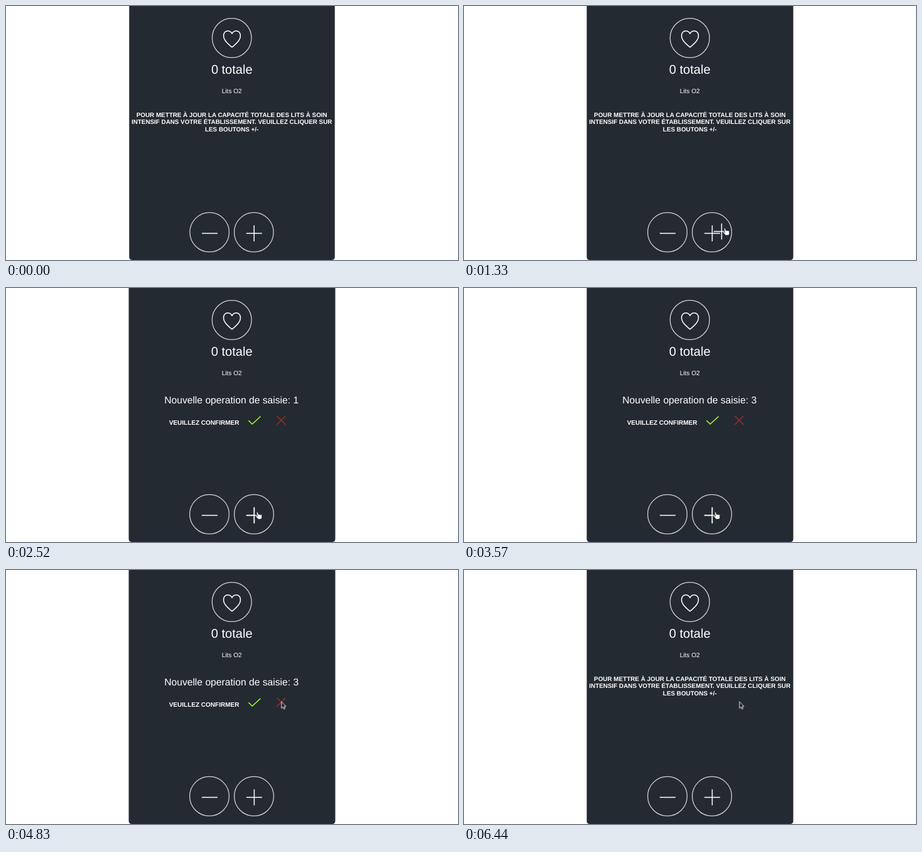
Write an HTML page that moves like this. It is 720 px wide and 405 px high and loops after 8 s.

```html
<!DOCTYPE html>
<html lang="fr">
<head>
<meta charset="utf-8">
<title>Lits O2</title>
<style>
  html, body { margin: 0; width: 100%; height: 100%; overflow: hidden; background: #fff; }
  svg { display: block; width: 100vw; height: 100vh; }
  text {
    font-family: "Liberation Sans", Arial, sans-serif;
    fill: #fff; text-anchor: middle; text-rendering: geometricPrecision;
  }
  .title { font-size: 20.1px; }
  .label { font-size: 10.1px; }
  .info { font-size: 9.9px; font-weight: bold; }
  .entry { font-size: 15.65px; text-anchor: start; }
  .ask { font-size: 10px; font-weight: bold; text-anchor: start; }
  .ring { fill: none; stroke: #d0d1d2; stroke-width: 1.3; }
  .icon { fill: none; stroke: #fff; stroke-width: 1.5; }

  #panel, .help, .confirm, .n1, .n2, .n3, .no, .arrow, .hand {
    animation: 8s step-end infinite;
  }
  #panel { transform-origin: 360px 0; animation-name: settle; }
  .help { animation-name: help; }
  .confirm { animation-name: confirm; }
  .n1 { animation-name: one; }
  .n2 { animation-name: two; }
  .n3 { animation-name: three; }
  .no { animation-name: press; }
  .arrow { animation-name: arrow; }
  .hand { animation-name: hand; }
  #cursor { animation: move 8s linear infinite; }

  @keyframes settle { 0% { transform: scaleX(.9955); } 10.5%, 100% { transform: none; } }
  @keyframes help { 0%, 80.5%, 100% { opacity: 1; } 31.5% { opacity: 0; } }
  @keyframes confirm { 0%, 80.5%, 100% { opacity: 0; } 31.5% { opacity: 1; } }
  @keyframes one { 0%, 37.625%, 100% { opacity: 0; } 31.5% { opacity: 1; } }
  @keyframes two { 0%, 44.625%, 100% { opacity: 0; } 37.625% { opacity: 1; } }
  @keyframes three { 0%, 100% { opacity: 0; } 44.625% { opacity: 1; } }
  @keyframes press { 0%, 80.5%, 100% { opacity: 1; } 79.625% { opacity: .85; } }
  @keyframes arrow { 0%, 16.625% { opacity: 0; } 14%, 53.375%, 100% { opacity: 1; } }
  @keyframes hand { 0%, 53.375%, 100% { opacity: 0; } 16.625% { opacity: 1; } }

  /* The pointer advances once every 70 ms. */
  @keyframes move {
    0%, 14% { transform: translate(470px, 333px); animation-timing-function: steps(4, start); }
    17.5% { transform: translate(415px, 354px); animation-timing-function: steps(4, start); }
    21%, 52.5% { transform: translate(400px, 357px); animation-timing-function: steps(3, start); }
    55.125% { transform: translate(425px, 305px); animation-timing-function: steps(3, start); }
    57.75% { transform: translate(458.8px, 221.7px); animation-timing-function: steps(4, start); }
    61.25%, 100% { transform: translate(438.4px, 209.4px); }
  }
</style>
</head>
<body>
<svg viewBox="0 0 720 405">
  <g id="panel">
    <path fill="#242a31" d="M195.5 0H524.5V400Q524.5 405 519.5 405H200.5Q195.5 405 195.5 400Z"/>

    <circle class="ring" cx="359.7" cy="51" r="31.4"/>
    <path class="icon" stroke-width="1.7" stroke-linejoin="round"
      d="M360 65.8C354 60.6 346.5 54.8 346.5 47.2C346.5 42.8 349.5 39.8 353.2 39.8C356.3 39.8 358.7 41.5 360 44.2C361.3 41.5 363.7 39.8 366.8 39.8C370.5 39.8 373.5 42.8 373.5 47.2C373.5 54.8 366 60.6 360 65.8Z"/>
    <text class="title" x="359.7" y="108">0 totale</text>
    <text class="label" x="359.7" y="139.4">Lits O2</text>

    <g class="help">
      <text class="info" x="359.7" y="177">POUR METTRE À JOUR LA CAPACITÉ TOTALE DES LITS À SOIN</text>
      <text class="info" x="359.7" y="188.4">INTENSIF DANS VOTRE ÉTABLISSEMENT. VEUILLEZ CLIQUER SUR</text>
      <text class="info" x="359.7" y="199.8">LES BOUTONS +/-</text>
    </g>

    <g class="confirm">
      <text class="entry" x="252.2" y="184.2">Nouvelle operation de saisie:</text>
      <text class="entry n1" x="457.6" y="184.2">1</text>
      <text class="entry n2" x="457.6" y="184.2">2</text>
      <text class="entry n3" x="457.6" y="184.2">3</text>
      <text class="ask" x="259.7" y="218">VEUILLEZ CONFIRMER</text>
      <path class="icon" style="stroke:#adff2f" d="M386.3 211.2L392.2 217L405.5 204.8"/>
      <path class="icon no" style="stroke:#a52a2a" d="M431.3 203.8L445.5 218M445.5 203.8L431.3 218"/>
    </g>

    <circle class="ring" cx="324" cy="360.8" r="31.4"/>
    <circle class="ring" cx="395" cy="360.8" r="31.4"/>
    <path class="icon" d="M311.8 362.5H337M382.8 362.5H408M395.4 349.8V375.2"/>
  </g>

  <g id="cursor">
    <g class="arrow">
      <path fill="#15181c" stroke="#fff" stroke-width=".9" stroke-linejoin="round"
        d="M.4 .6V11L2.8 8.8L4.4 12.4L6.1 11.7L4.5 8.1H7.5Z"/>
    </g>
    <g class="hand">
      <path fill="#242a31" d="M-4 -.5H8V12H-4Z"/>
      <path class="icon" d="M-17.2 5.5H8M-4.6 -7.2V18.2"/>
      <path fill="#fff" stroke="#15181c" stroke-width=".7" stroke-linejoin="round"
        d="M-.9 .8Q.3 -.7 1.2 .9L2.3 4.2Q3.4 3.2 4.1 4.3Q5.2 3.5 5.8 4.7Q7.2 4.2 7.5 5.6Q8.2 9 6.9 11.3L2.1 11.9Q.5 9.4 -2.8 7.3Q-2.9 5.7 -1.2 6.3L.5 7.1Z"/>
    </g>
  </g>
</svg>
</body>
</html>
```
